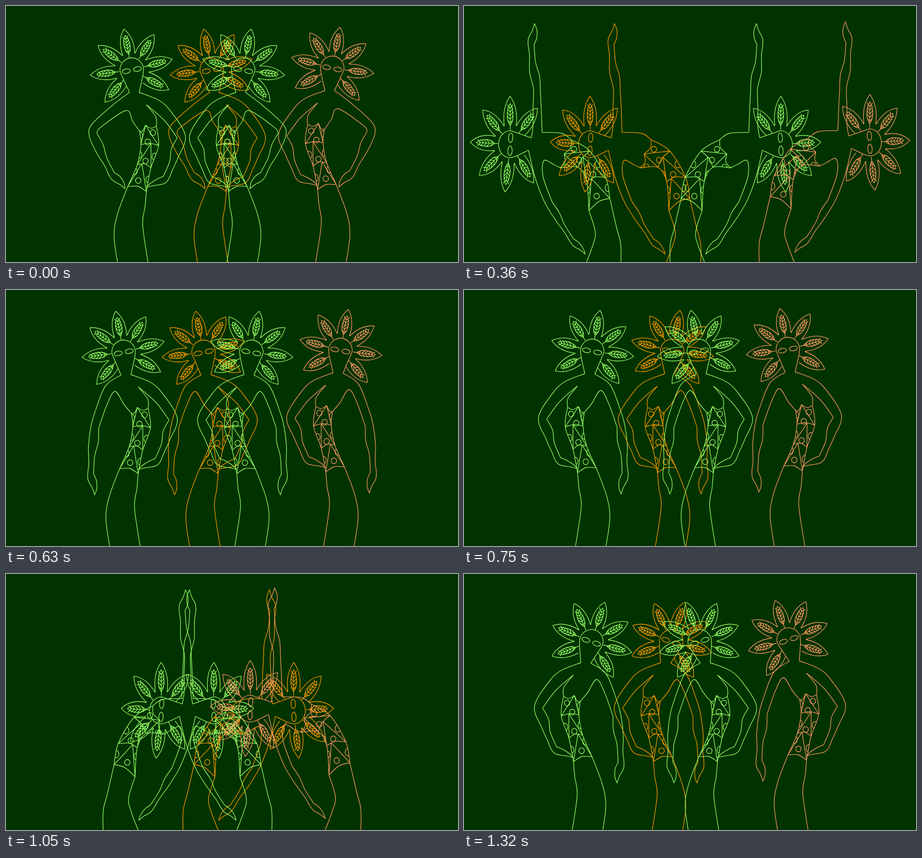
An HTML page with a canvas that plays this animation: 995 by 563 pixels, repeating every 1.38 s.

```html
<!DOCTYPE html>
<html>
<head>
<meta charset="utf-8">
<title>Dancers</title>
<style>
html, body { margin: 0; overflow: hidden; background: #030; }
canvas { display: block; }
</style>
</head>
<body>
<canvas id="stage" width="995" height="563"></canvas>
<script>
const ctx = document.getElementById('stage').getContext('2d');
const rad = Math.PI / 180;

// "x,y x,y / x,y ..." becomes a list of strokes, each a list of points
const strokes = text => text.split('/').map(s => s.trim().split(/\s+/).map(p => p.split(',').map(Number)));

const mix = (a, b, t) =>
  typeof a === 'number' ? a + (b - a) * t :
  Array.isArray(a) ? a.map((v, i) => mix(v, b[i], t)) :
  Object.fromEntries(Object.keys(a).map(k => [k, mix(a[k], b[k], t)]));

// Upper arm: outer side / inner side from the elbow / chest line.
// Forearm: angle, length, bend at the wrist, width.
const arm = (upper, angle, length, bend = 0, width = 1) => ({ upper: strokes(upper), fore: [angle, length, bend, width] });

// Suit: left and right edge at the neckline, two bands and the hem. Legs go on from the hem.
const pose = (head, left, right, suit, legs) => ({ head, left, right, suit: strokes(suit), legs: strokes(legs) });

const hangArm = arm('253,187 219,211 196,268 187,300 / 204,304 222,253 240,223 260,252 276,271', 93.5, 147);
const leftHip = arm('254,186 218,213 172,255 165,281 / 182,276 190,263 246,226 261,250 276,271', 63, 137);
const rightHip = arm('275,186 318,203 345,228 377,282 / 359,286 330,247 291,213 / 291,213 312,240 313,260', 122, 128, 14);
const rightOut = arm('275,178 328,195 360,204 388,212 / 375,229 333,217 296,212 / 296,212 314,240 313,260', 76.5, 128, 15);
const level = [259, 137, -11, 1, 1], tilted = [252, 140, -19, 1, 1]; // x, y, turn, scale

const stand = (head, left, right) => pose(head, left, right,
  '276,271 279,301 271,345 250,393 / 313,260 318,303 301,352 291,404',
  '227,455 220,505 231,580 / 288,438 283,480 298,580');

const reach = pose([206, 143, -34, 1, 1],
  arm('214,187 190,225 183,260 179,300 / 195,316 201,262 214,228 240,250 258,265', 80, 147),
  arm('236,174 262,169 295,155 329,132 / 335,152 300,178 264,200 / 264,200 284,218 291,243', 38, 109, 25),
  '258,265 265,291 266,335 252,390 / 291,243 305,280 306,347 298,396',
  '238,435 233,485 251,580 / 292,445 297,490 316,580');

const bend = pose([102, 304, -87, 1.15, .96],
  arm('142,317 155,372 170,415 182,440 / 194,431 174,375 176,340 198,349 212,356', 57.6, 136, 0, .75),
  arm('148,290 152,265 152,225 153,183 / 168,185 170,225 172,278 / 172,278 215,280 236,294', -95, 147),
  '212,356 251,355 270,386 275,450 / 236,294 277,319 312,377 321,423',
  '289,497 283,528 263,580 / 336,488 345,525 345,580');

const halfway = mix(reach, bend, .5);
const steps = [ // pose, shift x, shift y
  [stand(level, leftHip, rightHip), 18, 4],
  [stand(level, hangArm, rightHip), 18, 2],
  [stand(tilted, hangArm, rightHip), 20, -1],
  [stand(tilted, hangArm, rightOut), 21, -3],
  [reach, 0, 0], [halfway, 0, 0], [bend, 0, 0], [halfway, -10, 0], [reach, -20, 0],
  [stand(tilted, hangArm, rightOut), 0, 0],
  [stand(level, hangArm, rightHip), 0, 0]
];
const lastPose = stand(tilted, hangArm, rightHip);

// Catmull-Rom curve through the points
function curve(path, pts, joined) {
  const at = i => pts[Math.max(0, Math.min(pts.length - 1, i))];
  if (!joined) path.moveTo(...pts[0]);
  for (let i = 0; i < pts.length - 1; i++) {
    const [a, b, c, d] = [at(i - 1), at(i), at(i + 1), at(i + 2)];
    path.bezierCurveTo(b[0] + (c[0] - a[0]) / 6, b[1] + (c[1] - a[1]) / 6,
      c[0] - (d[0] - b[0]) / 6, c[1] - (d[1] - b[1]) / 6, ...c);
  }
}

function oval(path, [x, y], rx, ry) {
  path.moveTo(x + rx, y);
  path.ellipse(x, y, rx, ry, 0, 0, 7);
}

let leafShape = 'M-13.5,-35C-17,-58 -12,-78 0,-92C12,-78 17,-58 13.5,-35' +
  'M0,-28V-72M0,-36C-10,-48 -8,-66 0,-78C8,-66 10,-48 0,-36';
for (let y = -41; y > -70; y -= 7) leafShape += `M-6,${y - 7}Q-4,${y - 2} 0,${y}Q4,${y - 2} 6,${y - 7}`;
const leaf = new Path2D(leafShape);

const crown = new Path2D();
for (let i = -3; i <= 3; i++) crown.addPath(leaf, new DOMMatrix().rotate(i * 43));
for (const x of [-12.5, 12.5]) oval(crown, [x, 0], 9, 5);

function addHead(path, [x, y, turn, sx, sy], neckLeft, neckRight) {
  const place = new DOMMatrix().translate(x, y).rotate(turn).scale(sx, sy);
  path.addPath(crown, place);
  const face = [neckLeft];
  for (let a = 150; a <= 390; a += 40) {
    const p = place.transformPoint({ x: 26 * Math.cos(a * rad), y: 27 * Math.sin(a * rad) });
    face.push([p.x, p.y]);
  }
  curve(path, [...face, neckRight]);
}

function addArm(path, { upper: [outer, inner, chest], fore: [angle, length, bow, width] }, side) {
  const [ex, ey] = inner[0], c = Math.cos(angle * rad), s = Math.sin(angle * rad);
  // point at part t of the forearm, off to the outer side
  const spot = ([t, off]) => {
    const along = t * length, out = side * (off * width + bow * Math.sin(Math.PI * t ** 1.8));
    return [ex + c * along + s * out, ey + s * along - c * out];
  };
  curve(path, [...outer, ...[[.28, 20], [.53, 17], [.69, 18], [.79, 16], [.9, 6], [1, 0]].map(spot)]);
  curve(path, [[1, 0], [.9, -4], [.78, -2], [.69, 5]].map(spot));
  curve(path, [[.69, 5], [.42, 5], [.21, -1], [0, 0]].map(spot));
  curve(path, inner);
  if (chest) curve(path, chest);
}

function addSuit(path, [left, right]) {
  const at = (row, u, v) => mix(mix(left[row], right[row], u), mix(left[row + 1], right[row + 1], u), v);
  const [px, py] = at(0, .35, 0), peak = [px, py - 9];
  const sag = (a, b) => {
    const [x, y] = mix(a, b, .5), top = at(0, .5, 0), low = at(0, .5, .16);
    curve(path, [a, [x + low[0] - top[0], y + low[1] - top[1]], b]);
  };
  curve(path, left);
  curve(path, right);
  sag(left[0], peak);
  sag(peak, right[0]);
  [peak, at(0, .58, .9), at(1, .3, .9)].forEach((apex, row) => {
    const [l, r] = [left[row + 1], right[row + 1]];
    curve(path, [l, at(row, .5, .88), r]);
    curve(path, [l, apex]);
    curve(path, [apex, r]);
  });

  const outline = new Path2D(), spots = new Path2D();
  curve(outline, left);
  outline.lineTo(...at(2, .5, .88));
  outline.lineTo(...right[3]);
  curve(outline, [...right].reverse(), true);
  for (const [row, u, v] of [[0, .75, .3], [0, .4, .8], [1, .5, .75], [2, .42, .64]]) oval(spots, at(row, u, v), 6, 6.3);
  for (const [row, u, v] of [[0, 0, .35], [1, 0, .5], [1, 1, .5], [2, 0, .3], [2, 1, .5]]) oval(spots, at(row, u, v), 6, 8);
  ctx.save();
  ctx.clip(outline);
  ctx.stroke(spots);
  ctx.restore();
}

function drawFigure({ head, left, right, suit, legs }) {
  const body = new Path2D();
  addHead(body, head, left.upper[0][0], right.upper[0][0]);
  addArm(body, left, -1);
  addArm(body, right, 1);
  addSuit(body, suit);
  legs.forEach((leg, i) => curve(body, [suit[i][3], ...leg]));
  ctx.stroke(body);
}

const dancers = [ // colour, direction, x, y
  ['#9f6', 1, 0, 0], ['#f90', 1, 176, 0], ['#9f6', -1, 799, 0], ['#f96', -1, 995, -4]
];

function render() {
  const time = performance.now() % 1380;
  const beat = time % 690;
  const step = Math.floor((beat < 390 ? beat : beat - 30) / 60); // the bend holds longer
  const mirrored = time >= 690;
  let [figure, dx, dy] = steps[step];
  if (mirrored && step === 10) figure = lastPose;

  ctx.setTransform(1, 0, 0, 1, 0, 0);
  ctx.fillStyle = '#030';
  ctx.fillRect(0, 0, 995, 563);
  ctx.lineWidth = 1.35;
  ctx.lineJoin = 'round';
  for (const [colour, dir, x, y] of dancers) {
    ctx.setTransform(dir, 0, 0, 1, x, y);
    if (mirrored) {
      ctx.translate(step < 7 ? 559 : 532, step < 7 ? -4 : 9);
      ctx.scale(-1, 1);
    }
    ctx.translate(dx, dy);
    ctx.strokeStyle = colour;
    drawFigure(figure);
  }
  requestAnimationFrame(render);
}
render();
</script>
</body>
</html>
```
